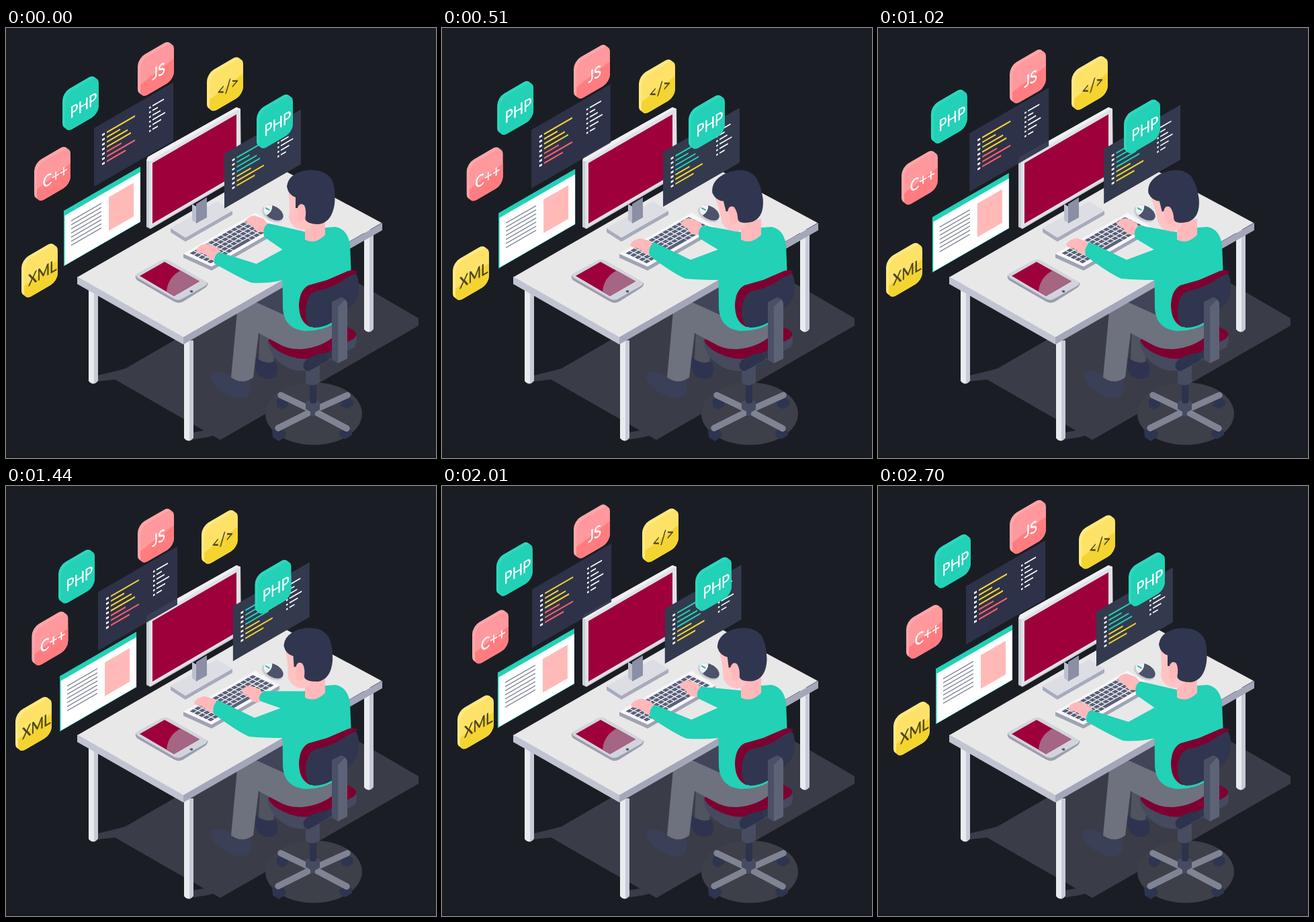
Animation, 640 px wide and 640 px high, one loop 2.76 s. Source, as an HTML page:

```html
<!DOCTYPE html>
<html lang="en">
<head>
<meta charset="utf-8">
<title>Developer at a desk</title>
<style>
html, body { margin: 0; width: 100%; height: 100%; overflow: hidden; background: #1a1e24; }
svg { display: block; width: 100vw; height: 100vh; }
text { font: 23.5px Lato, sans-serif; text-anchor: middle; stroke-width: .4; }
</style>
</head>
<body>
<svg viewBox="0 0 640 640">
  <rect width="640" height="640" fill="#1a1e24"/>
  <rect y="636" width="640" height="4" fill="#181a22"/>

  <!-- floor shadows -->
  <g fill="#3a3d47">
    <path d="M162 523V516L461 343L614 432V443L319 613Z"/>
    <path d="M128 527L137 517L162 511L185 505L163 523Z"/>
    <path d="M275 613L278 602L306 597L322 603L300 609Z"/>
  </g>
  <ellipse cx="458" cy="574" rx="72" ry="46.5" fill="#3d3f49"/>

  <g id="legs"></g>

  <!-- chair base -->
  <g fill="#2e3550">
    <path d="M403 553L412 549L420 556V562L411 568L403 563Z"/>
    <path d="M498 556L508 549L517 555V561L508 567L499 563Z"/>
    <path d="M396 599L407 595L416 601V608L406 615L397 609Z"/>
    <path d="M496 601L506 595L515 600V606L505 612L497 608Z"/>
  </g>
  <path d="M457 569.500L409 546.500M457 569.500L508 546.500M457 569.500L405 595.500M457 569.500L507 596" stroke="#7f8392" stroke-width="9.500" stroke-linecap="round"/>
  <path d="M446 556L456 552L467 556V568L460 572V577H453V571L446 567Z" fill="#454b60"/>
  <path d="M452 526H462V557Q457 561 452 557Z" fill="#2d334c"/>
  <path d="M446 502H467V527Q457 536 446 528Z" fill="#474c60"/>

  <!-- far leg -->
  <path d="M376 398L412 380V432L376 420Z" fill="#41455a"/>
  <path d="M378 448L403 455L398 497Q388 502 376 494Z" fill="#50545f"/>
  <path d="M371 489Q385 502 400 496Q408 506 402 519Q392 526 378 518Q369 512 371 489Z" fill="#2e3450"/>

  <!-- seat -->
  <path d="M389 466Q392 494 425 508Q445 514 462 505L519 475Q524 465 521 456Z" fill="#454a5e"/>
  <path d="M390 464Q392 472 404 480Q436 500 470 488L518 462Q524 457 519 451L500 440L420 455Z" fill="#7e0030"/>
  <path d="M443 499Q448 488 478 483L481 494L450 511Q441 509 443 499Z" fill="#2d334c"/>

  <!-- near leg -->
  <path id="shoe" d="M304 518Q306 510 318 512Q332 514 340 523Q352 530 363 524Q367 539 360 548Q347 555 328 545Q306 533 304 518Z" fill="#3a4058"/>
  <path d="M346 400L372 408L414 427L440 446L488 436V459Q470 475 440 478Q420 479 404 469L376 454L368 520Q352 532 335 520Z" fill="#6e717e"/>

  <!-- desk -->
  <path d="M106 371L397 203L559 290L264 461Z" fill="#e8e8e8"/>
  <path d="M106 370L264 460V471L106 381Z" fill="#c1c4d1"/>
  <path d="M264 460L560 290V301L264 471Z" fill="#a4a7b9"/>

  <!-- monitor -->
  <path d="M245 298V304L267 318L337 278V272L267 312Z" fill="#a7abbb"/>
  <path d="M245 298L314 258L337 272L267 312Z" fill="#dcdee4"/>
  <path d="M277 262L284 266V291L277 286Z" fill="#bdc0cc"/>
  <path d="M283 262L299 252V282L283 291Z" fill="#8a8fa5"/>
  <path d="M209 197L211 192L343 118L349 120L350 217Q350 221 345 223L215 299L209 296Z" fill="#cbcdd6"/>
  <path d="M209 197L211 192L343 118L349 121L214 199Z" fill="#f0f0f3"/>
  <path d="M213 202Q213 199 216 197L344 122L349 121V218L216 297L213 298Z" fill="#e0e1e7"/>
  <path d="M218 201L343 128.500V218L218 291Z" fill="#9e003c"/>

  <!-- tablet -->
  <path d="M193 368L300 379Q301 384 296 387L264 407Q257 411 250 407L196 376Q192 373 193 368Z" fill="#9a9eaf"/>
  <path d="M196 365L231 346Q237 343 243 346L297 377Q302 380 296 384L264 402Q257 407 250 403L196 372Q191 368 196 365Z" fill="#d2d4dc"/>
  <path d="M199 369L236 348L288 377L250 399Z" fill="#9e003c"/>
  <path d="M260 361L288 377L250 399L239 392Q241 371 260 361Z" fill="#a46683"/>
  <ellipse cx="276" cy="392" rx="2.4" ry="1.7" fill="#51576d"/>

  <!-- keyboard -->
  <path d="M264 336V342L306 361L407 303V297L306 355Z" fill="#9fa3b4"/>
  <path d="M264 336L371 275L407 297L306 355Z" fill="#f7f7f9"/>
  <g id="keys" fill="#596079"></g>

  <!-- mouse -->
  <g transform="rotate(30 397 275)">
    <ellipse cx="397.5" cy="277" rx="17" ry="10" fill="#c9ccd6"/>
    <ellipse cx="398" cy="274.500" rx="16" ry="9.500" fill="#4d536b"/>
    <path d="M391 265.800A16 9.500 0 0 0 391 283Q396 274 391 265.800Z" fill="#f1f1f4"/>
    <path d="M384 274H391" stroke="#25b9a5" stroke-width="2"/>
  </g>

  <g id="panels"></g>
  <g id="icons"></g>

  <!-- person -->
  <path id="handR" d="M355 291Q360 284 368 283L382 288L389 296L382 308L372 307Q367 302 364 297Q358 296 355 291Z" fill="#ffb9bb"/>
  <path id="armR" fill="#22d1b6"/>
  <path id="handL" d="M280 322Q285 314 296 313L309 317L317 325L309 338L300 335Q296 329 288 327Q281 327 280 322Z" fill="#ffb9bb"/>
  <path id="armL" fill="#22d1b6"/>
  <path d="M411 328L443 306Q462 297 490 296Q508 299 512 322L514 372L488 440Q470 451 446 451C420 449 412 432 412 415Z" fill="#22d1b6"/>
  <path d="M445 291L475 284V308Q460 323 445 315Z" fill="#ffb9bb"/>
  <g id="head">
    <path d="M420 240Q423 268 421 282Q424 296 438 300Q448 302 456 293L462 250Z" fill="#ffc3c4"/>
    <path d="M418 236Q420 217 446 212Q474 209 485 226Q491 238 489 262Q485 289 466 292Q450 292 446 286L441 268H431V252Q420 248 418 236Z" fill="#30364f"/>
    <path d="M434 267Q438 259 444 264Q448 272 445 285Q438 292 433 286Z" fill="#ffb9bb"/>
  </g>

  <!-- chair back -->
  <path d="M523 363Q518 358 508 362L478 375L450 383Q437 390 436 412Q436 438 453 445L470 440L500 385Z" fill="#7e0030"/>
  <path d="M521 366Q526 372 525 392Q522 410 508 418L486 438Q472 446 459 446Q445 444 446 420Q447 398 460 392Q485 387 501 376Q513 367 521 366Z" fill="#30364f"/>
  <path d="M478 483L487 478V493L478 491Z" fill="#30364f"/>
  <path d="M485 408L498 401Q507 402 508 412V492L494 499L485 494Z" fill="#4a5065"/>
  <path d="M494 415L505 404Q508 407 508 412V492L494 499Z" fill="#5d6377"/>
</svg>

<script>
const PERIOD = 2700, LOOP = 2760, STEP = 30;
const $ = id => document.getElementById(id);
const rect = (x, y, w, h, fill, more = '') =>
  `<rect x="${x}" y="${y}" width="${w}" height="${h}" fill="${fill}" ${more}/>`;

// desk legs: x, top, bottom
$('legs').innerHTML = [[123, 385, 530], [265, 465, 615], [533, 300, 453]].map(([x, a, b]) =>
  `<path d="M${x} ${a}h14V${b - 5}q-7 9 -14 0Z" fill="#c8cbd6"/>
   <path d="M${x} ${a}h8V${b - 1}q-6 0 -8 -4Z" fill="#eaebef"/>`).join('');

let keys = '';
for (let row = 0; row < 5; row++) {
  for (let col = 0; col < 14; col++) {
    if (row === 4 && col > 4 && col < 9) continue;
    keys += `<rect x="${6 + col * 7.9}" y="${5 + row * 7.5}" width="6.500" height="5.800"/>`;
  }
}
keys += '<rect x="45.500" y="35" width="30.500" height="5.800"/>';
$('keys').innerHTML = `<g transform="matrix(.86 -.492 .87 .42 264 336)">${keys}</g>`;

function codePanel(back, accents, height, opacity) {
  let s = rect(0, 0, 118, height, back, `opacity="${opacity}"`);
  [42, 20, 31, 36, 22, 42, 28].forEach((w, i) => {
    const y = 16 + i * 7.2;
    s += rect(12, y, 4, 3, '#fff') + rect(19, y, w, 2.4, accents[i < 4 ? 0 : 1]);
  });
  [17, 8, 12, 19, 13, 8].forEach((w, i) => {
    const y = 16 + i * 7;
    s += rect(82, y, 2.6, 2.6, '#fff') + rect(87, y, w, 2, '#fff');
  });
  return s;
}

function pagePanel() {
  let s = rect(0, 0, 114, 82.5, '#22d1b6') + rect(1.5, 8, 112.5, 74, '#fff');
  for (let i = 0; i < 7; i++) s += rect(11, 20.5 + i * 6.1, 45, 1.5, '#7a8093');
  return s + rect(67, 18.5, 37, 50, '#ffbab8');
}

// start position, travel, scale, content
const panels = [
  { at: [131, 149], by: [6, 9], k: 1, art: codePanel('#2e334b', ['#f2d233', '#f9616c'], 87, .94) },
  { at: [86, 272], by: [-6, 11], k: 1, art: pagePanel() },
  { at: [325, 187], by: [13, -8], k: .965, art: codePanel('#333a4e', ['#22d1b6', '#f2d233'], 84.5, 1) }
];

const TIMES = [0, 510, 1020, 1440, 2010, 2250];
const PINK = ['#ffa6aa', '#ff999d', '#ff7d80', '#fff'];
const YELLOW = ['#ffe97f', '#fee268', '#f4d431', '#4a431f'];
const TEAL = ['#2bd9bd', '#22d1b6', '#22d1b6', '#fff'];

// a pair is swung out and back; xs and ys give a closed path
const icons = [
  { label: 'JS', tone: PINK, at: [196, 21], by: [0, 13] },
  { label: 'PHP', tone: TEAL, at: [84, 72], by: [-6, 23] },
  { label: 'C++', tone: PINK, xs: [42, 36.7, 35, 38.4, 45, 46], ys: [177, 177.5, 183, 187, 184.5, 181.5] },
  { label: '</>', tone: YELLOW, xs: [299, 293, 288, 291, 298, 301], ys: [43.5, 47, 42, 36, 33.5, 36.5] },
  { label: 'PHP', tone: TEAL, xs: [373, 367, 366, 370.5, 377, 377], ys: [99, 100, 106.5, 110, 106, 103] },
  { label: 'XML', tone: YELLOW, xs: [23, 16, 12, 14, 23, 25], ys: [321, 325, 320, 314, 311.5, 315] }
];

function iconArt({ label, tone }) {
  const [edge, light, dark, ink] = tone;
  const tile = (x, y, fill) => rect(0, 0, 57.7, 57.2, fill, `rx="12" transform="matrix(.866 -.5 0 1 ${x} ${y})"`);
  const safe = label.replace('<', '&lt;').replace('>', '&gt;');
  return tile(0, 24.2, edge) + tile(2, 25.7, edge) + tile(4, 27.2, light) +
    `<g transform="matrix(.866 -.5 0 1 4 27.2)">
      <path d="M0 36L57.7 26V45.200a12 12 0 0 1 -12 12H12a12 12 0 0 1 -12 -12Z" fill="${dark}"/>
      <text x="31.500" y="40" fill="${ink}" stroke="${ink}">${safe}</text>
    </g>`;
}

function fill(id, list, art) {
  $(id).innerHTML = list.map(o => `<g>${art(o)}</g>`).join('');
  list.forEach((o, i) => { o.el = $(id).children[i]; });
}
fill('panels', panels, o => o.art);
fill('icons', icons, iconArt);

// smooth closed curve through values at TIMES
function spline(v, t) {
  const n = v.length;
  const time = i => TIMES[(i + n) % n] + PERIOD * Math.floor(i / n);
  const val = i => v[(i + n) % n];
  const slope = i => (val(i + 1) - val(i - 1)) / (time(i + 1) - time(i - 1));
  let i = n - 1;
  while (t < TIMES[i]) i--;
  const d = time(i + 1) - time(i), u = (t - time(i)) / d, w = 1 - u;
  return val(i) * w * w * (1 + 2 * u) + val(i + 1) * u * u * (3 - 2 * u) +
    d * u * w * (w * slope(i) - u * slope(i + 1));
}

const swing = u => (1 - Math.cos(Math.PI * u)) / 2;

// eased keyframes: [time, value] pairs
function ease(frames, t) {
  let i = 0;
  while (i < frames.length - 2 && t >= frames[i + 1][0]) i++;
  const [a, from] = frames[i], [b, to] = frames[i + 1];
  return from + (to - from) * swing(Math.min(1, (t - a) / (b - a)));
}

const HEAD = [[0, 0], [450, 1], [1050, 1], [1650, 0], [1800, 0], [2220, 1], [2250, 1], [2700, 0]];
const HAND_L = [[0, 8], [510, 0], [1440, 0], [1800, 0], [2250, 8], [2700, 8]];
const HAND_R = [[0, -4], [510, 0], [1020, 0], [1440, 14], [2010, 6], [2250, 6], [2700, -4]];
const SHOE = [[0, 0], [570, 0], [1020, 1], [1110, .4], [1620, .4], [1800, 0], [2700, 0]];

function draw(t) {
  const p = swing(2 * t / PERIOD);
  for (const { el, at, by, k } of panels) {
    el.setAttribute('transform',
      `matrix(${k} ${-.577 * k} 0 ${k} ${at[0] + by[0] * p} ${at[1] + by[1] * p})`);
  }
  for (const { el, at, by, xs, ys } of icons) {
    const x = xs ? spline(xs, t) : at[0] + by[0] * p;
    const y = ys ? spline(ys, t) : at[1] + by[1] * p;
    el.setAttribute('transform', `translate(${x} ${y})`);
  }

  const turn = ease(HEAD, t), tap = ease(SHOE, t);
  $('head').setAttribute('transform', `translate(${-2.5 * turn} 0) rotate(${-14 * turn} 450 294)`);
  $('shoe').setAttribute('transform', `rotate(${2 * tap} 355 548) translate(${tap} 0)`);

  const l = ease(HAND_L, t), lx = l * .35, e = l * .75;
  $('handL').setAttribute('transform', `translate(${lx} ${l})`);
  $('armL').setAttribute('d', `M${316 + lx * .3} ${319 + l * 1.8}L${370 + lx} ${345 + e}L413 329V375
    Q${385 + lx} ${375 + e} ${362 + lx} ${373 + e}Q${345 + lx} ${366 + e} ${309 + lx * .3} ${339 + l * 1.4}
    Q${306 + lx} ${326 + l * 1.6} ${316 + lx * .3} ${319 + l * 1.8}Z`);

  const r = ease(HAND_R, t), rx = -r * .35;
  $('handR').setAttribute('transform', `translate(${rx} ${r})`);
  $('armR').setAttribute('d', `M${389 + rx} ${294 + r * .8}L446 ${304 + r * .1}L440 340L411 ${330 + r * .1}
    L${383 + rx} ${313 + r * .5}Q${379 + rx} ${300 + r * .8} ${389 + rx} ${294 + r * .8}Z`);
}

function tick(now) {
  const t = Math.floor((now % LOOP) / STEP) * STEP;
  draw(t % PERIOD);
  requestAnimationFrame(tick);
}
draw(0);
requestAnimationFrame(tick);
</script>
</body>
</html>
```
